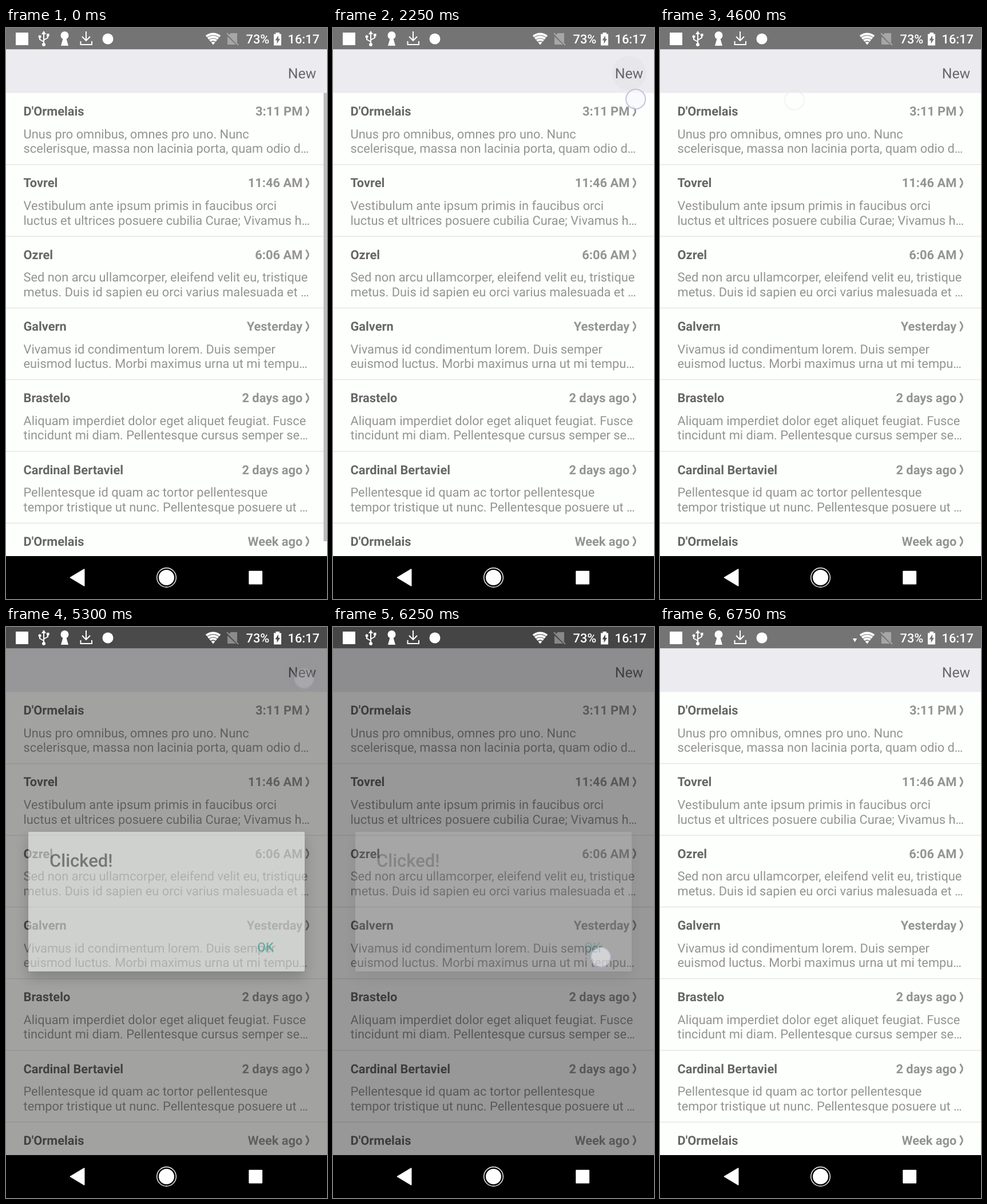
Recreate the animation shown at these times as an HTML page. Size 561 by 998 pixels, loop 7.95 s.

```html
<!DOCTYPE html>
<html lang="en">
<head>
<meta charset="utf-8">
<title>Message list</title>
<style>
  html, body { margin: 0; width: 100%; height: 100%; overflow: hidden; background: #000; }
  svg { display: block; width: 561px; height: 998px; font-family: Roboto, "Noto Sans", sans-serif; font-size: 21.82px; text-rendering: geometricPrecision; }
  .name { font-weight: 700; fill: #666; }
  .time { font-weight: 700; fill: #949494; text-anchor: end; }
  .body { fill: #949494; }
  .chev { fill: none; stroke: #949494; stroke-width: 2.8; stroke-linejoin: round; }
  .status { font-weight: 500; fill: #fff; }
  .panel { filter: drop-shadow(0 11px 11px rgba(0, 0, 0, .4)); }
</style>
</head>
<body>
<svg viewBox="0 0 561 998">
  <rect width="561" height="923" fill="#fdfffc"/>
  <rect width="561" height="37.5" fill="#747474"/>
  <rect y="37.5" width="561" height="76" fill="#ecebf0"/>
  <text x="542.2" y="88" font-size="24.8" fill="#686868" text-anchor="end">New</text>
  <circle id="ripple" cx="517.5" cy="79" r="30"/>
  <g id="list"></g>
  <rect id="bar" x="555" y="113.5" width="6" height="783.5" fill="#bdbdbd"/>
  <rect id="dim" width="561" height="923"/>

  <rect id="panel" class="panel" x="39" y="358" width="483" height="244" rx="2.5" fill="#fdfffc"/>
  <g id="labels" font-weight="500">
    <text x="76" y="419" font-size="31" fill="#212121">Clicked!</text>
    <text x="439" y="567.3" fill="#0b8f80">OK</text>
  </g>

  <g fill="#fff">
    <rect x="17" y="8" width="22" height="22"/>
    <g fill="none" stroke="#fff" stroke-width="2">
      <path d="M66 9V28M66 24L59 20V15M66 21L73 17V12"/>
      <path d="M140 6V21M133 15L140 22L147 15M130.5 23V29H150V23"/>
    </g>
    <path d="M66 5L70 11H62Z"/>
    <circle cx="66" cy="29" r="3"/>
    <circle cx="59" cy="15" r="2.5"/>
    <rect x="71" y="10" width="4.5" height="4.5"/>
    <circle cx="102.5" cy="13" r="7"/>
    <path d="M100 17H105L109 31H96Z"/>
    <circle cx="178" cy="19" r="9.5"/>
    <path id="signal" d="M336.8 20H344.2L340.5 26.5Z"/>
    <g id="wifi" fill="none" stroke="#fff" stroke-width="4"></g>
    <path d="M362 29.5L358.5 25Q362 22.8 365.5 25Z"/>
    <g opacity=".36">
      <path d="M393 9H404V26L389 12.5ZM387 15L402 29H387Z"/>
      <path d="M386 9L406 30" stroke="#fff" stroke-width="2"/>
    </g>
    <path fill-rule="evenodd" d="M471.5 8H478V10.5H481V30.5H468V10.5H471.5ZM476 13L470.5 21.5H473.5V27.5L479 19H476Z"/>
    <text class="status" x="419.5" y="27.4">73%</text>
    <text class="status" x="492.5" y="27.4">16:17</text>
  </g>

  <rect y="923" width="561" height="75" fill="#000"/>
  <g fill="#fff" stroke="#fff" stroke-width="2" stroke-linejoin="round">
    <path d="M112.7 960.5L136.5 946.3V974.7Z"/>
    <rect x="425.3" y="949.7" width="21.8" height="21.8"/>
    <circle cx="280.5" cy="960.5" r="12.5"/>
    <circle cx="280.5" cy="960.5" r="16.8" fill="none" stroke-width="1.4"/>
  </g>

  <circle id="touch" r="17" fill="#f8f8fc" fill-opacity=".74" stroke="#b9bbdc" stroke-opacity=".85" stroke-width="2"/>
  <circle id="trace" cx="235" cy="126" r="17" fill="none" stroke="#e2e2e6" stroke-opacity=".65" stroke-width="1.2"/>
</svg>
<script>
const $ = id => document.getElementById(id);
const LOOP = 7950, STEP = 50, PITCH = 125.3;
const LEG = 375, FADE = 200;
const BUTTON = [517.5, 79];

const rows = [
  ["D'Ormelais", "3:11 PM", "Unus pro omnibus, omnes pro uno. Nunc", "scelerisque, massa non lacinia porta, quam odio d…"],
  ["Tovrel", "11:46 AM", "Vestibulum ante ipsum primis in faucibus orci", "luctus et ultrices posuere cubilia Curae; Vivamus h…"],
  ["Ozrel", "6:06 AM", "Sed non arcu ullamcorper, eleifend velit eu, tristique", "metus. Duis id sapien eu orci varius malesuada et …"],
  ["Galvern", "Yesterday", "Vivamus id condimentum lorem. Duis semper", "euismod luctus. Morbi maximus urna ut mi tempu…"],
  ["Brastelo", "2 days ago", "Aliquam imperdiet dolor eget aliquet feugiat. Fusce", "tincidunt mi diam. Pellentesque cursus semper se…"],
  ["Cardinal Bertaviel", "2 days ago", "Pellentesque id quam ac tortor pellentesque", "tempor tristique ut nunc. Pellentesque posuere ut …"],
  ["D'Ormelais", "Week ago", "", ""]
];

$("list").innerHTML = rows.map(([name, time, a, b], i) => `
  <g transform="translate(0 ${i * PITCH})">
    <text class="name" x="30.5" y="153.2">${name}</text>
    <text class="time" x="518.3" y="153.2">${time}</text>
    <path class="chev" d="M524.5 137L528.3 143.5V147.5L524.5 154"/>
    <text class="body" x="30.5" y="192.7">${a}</text>
    <text class="body" x="30.5" y="218.3">${b}</text>
    <rect y="238.3" width="561" height="1" fill="#dbdcdb"/>
  </g>`).join("");

// Concentric wifi arcs around the fan's tip
$("wifi").innerHTML = [9, 14, 19].map(r => {
  const dx = r * Math.sin(.68), y = 29.5 - r * Math.cos(.68);
  return `<path d="M${362 - dx} ${y}A${r} ${r} 0 0 1 ${362 + dx} ${y}"/>`;
}).join("");

const ramp = (t, a, b) => Math.min(1, Math.max(0, (t - a) / (b - a)));
const smooth = u => u * u * (3 - 2 * u);
const fade = (id, v) => $(id).setAttribute("opacity", v);

// Drags leave the button, come back and leave again; taps stay put
const touches = [
  { down: 1250, move: 1650, gone: 2700, path: [[522, 90], [531, 169], [528, 100], [529, 197]] },
  { down: 3150, move: 3300, gone: 4600, path: [[531, 93], [409, 104], [520, 100], [235, 126]] },
  { down: 5050, gone: 5350, path: [[521, 90]] },
  { down: 6050, gone: 6400, path: [[468, 577]] }
];

function position({ move, gone, path }, t) {
  let [x, y] = path[0];
  for (let i = 1; i < path.length; i++) {
    const from = move + (i - 1) * LEG;
    const to = i === path.length - 1 ? gone : from + LEG;
    const u = smooth(ramp(t, from, to));
    x += (path[i][0] - path[i - 1][0]) * u;
    y += (path[i][1] - path[i - 1][1]) * u;
  }
  return [x, y];
}

function drawTouch(t) {
  const touch = touches.find(p => t >= p.down && t < p.gone);
  fade("touch", 0);
  fade("ripple", 0);
  if (!touch) return;
  const [x, y] = position(touch, t);
  const alpha = 1 - ramp(t, touch.gone - FADE, touch.gone);
  const near = 1 - ramp(Math.hypot(x - BUTTON[0], y - BUTTON[1]), 30, 70);
  $("touch").setAttribute("transform", `translate(${x} ${y})`);
  fade("touch", alpha);
  fade("ripple", .035 * near * alpha * ramp(t, touch.down, touch.down + FADE));
}

function draw(t) {
  const shown = ramp(t, 5200, 5400);
  fade("bar", 1 - ramp(t, 800, 1100));
  fade("dim", .6 * (ramp(t, 5150, 5400) - ramp(t, 6100, 6400) ** 1.6));
  fade("panel", shown * (1 - ramp(t, 6100, 6275)));
  fade("labels", shown * (1 - ramp(t, 6100, 6300)));
  fade("signal", t >= 6750 ? 1 : 0);
  fade("trace", t >= 4600 && t < 5050 ? 1 : 0);
  drawTouch(t);
}

const start = performance.now();
function tick() {
  const t = (performance.now() - start) % LOOP;
  draw(Math.floor(t / STEP) * STEP);
  requestAnimationFrame(tick);
}
tick();
</script>
</body>
</html>
```
